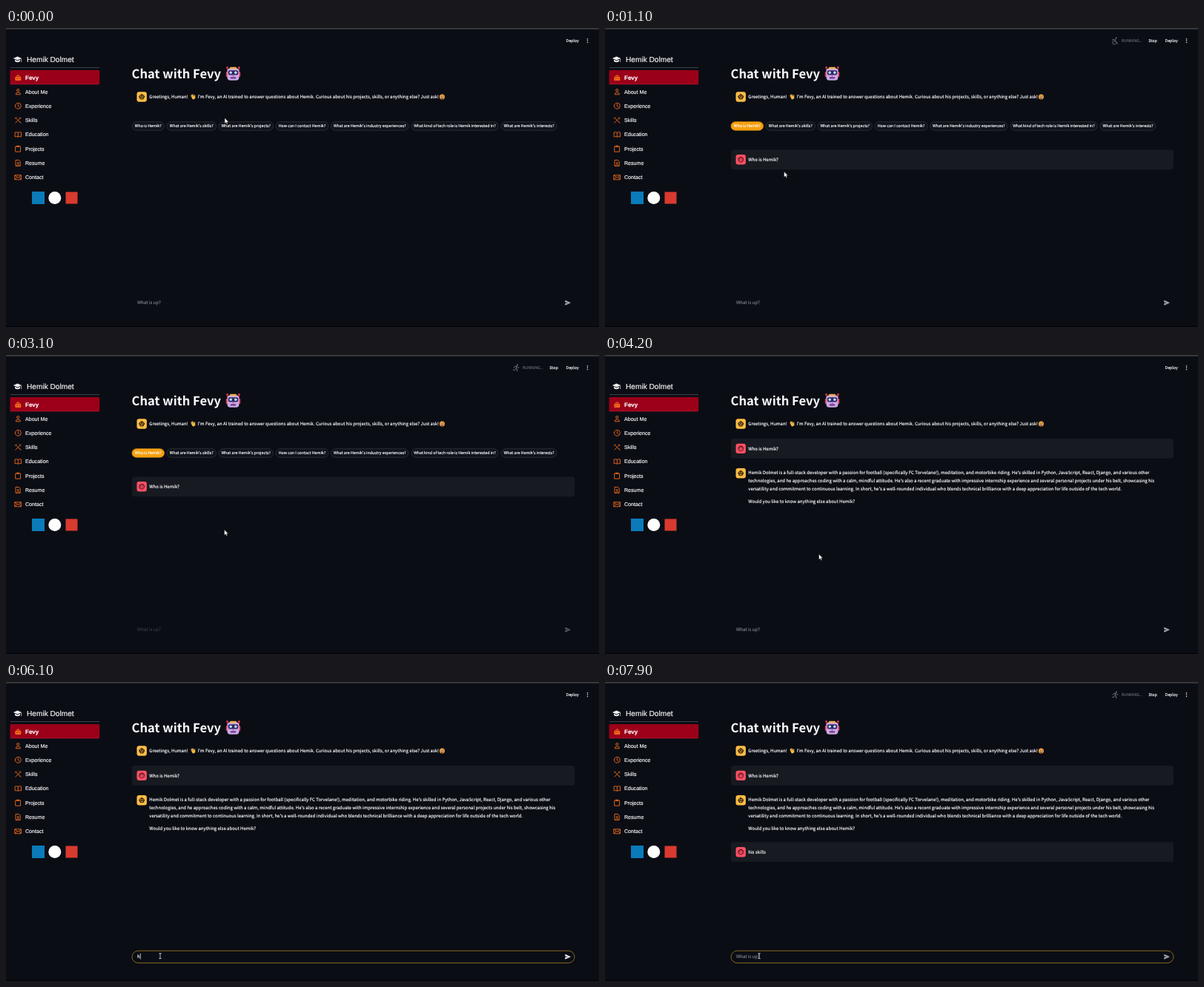
Write an HTML page that moves like this. It is 800 by 404 pixels and loops after 8000 ms.

```html
<!DOCTYPE html>
<html lang="en">
<head>
<meta charset="utf-8">
<style>
  html, body { margin: 0; width: 800px; height: 404px; overflow: hidden; background: #0b0d15; }
  svg { display: block; }
  text { font: 6px "Noto Sans CJK JP", "Noto Sans CJK SC", "Open Sans", sans-serif; fill: #fafafc; stroke: #fafafc; stroke-width: .16; white-space: pre; text-rendering: geometricPrecision; }
  .small { font-size: 5.3px; }
  .mid { text-anchor: middle; }
  .title { font-size: 16.6px; font-weight: 700; stroke: none; }
  .side { font: 7.1px "Liberation Sans", Arial, sans-serif; }
  .owner { font-size: 10.15px; }
  .active { font-size: 8px; font-weight: 700; }
  .muted { fill: #83868c; stroke: none; }
  .line { fill: none; stroke-width: .9; stroke-linecap: round; stroke-linejoin: round; }
</style>
</head>
<body>
<svg id="stage" width="800" height="404" viewBox="0 0 800 404"></svg>
<script>
const LOOP = 8000;
const CLICK = 700, ASKED = 800, RUN = 900, DIM = 2000, ANSWER = 3700;
const FOCUS = 4700, TYPE = 6000, SUBMIT = 7400, RUN_AGAIN = 7500;
const QUESTION = 'his skills';
const ORANGE = '#ef6c1a';

const text = (x, y, s, cls = '', extra = '') => `<text x="${x}" y="${y}" class="${cls}" ${extra}>${s}</text>`;
const rect = (x, y, w, h, fill, r = 0, extra = '') =>
  `<rect x="${x}" y="${y}" width="${w}" height="${h}" rx="${r}" fill="${fill}" ${extra}/>`;
const circle = (x, y, r, fill, extra = '') => `<circle cx="${x}" cy="${y}" r="${r}" fill="${fill}" ${extra}/>`;
const line = (d, color, extra = '') => `<path class="line" d="${d}" stroke="${color}" ${extra}/>`;
const group = (id, body) => `<g id="${id}">${body}</g>`;
const at = (x, y, body) => `<g transform="translate(${x} ${y})">${body}</g>`;

// Avatars and icons are drawn around their own centre.
const botAvatar = rect(-6.7, -6.7, 13.4, 13.4, '#ffbd45', 3)
  + rect(-4, -1.4, 8, 2.6, '#4a3310', 1) + rect(-3, -3, 6, 6.4, '#4a3310', 1.6) + circle(0, -3.4, .9, '#4a3310')
  + circle(-1.3, -.8, .7, '#ffbd45') + circle(1.3, -.8, .7, '#ffbd45')
  + rect(-1.4, 1.2, 2.8, .8, '#ffbd45');
const userAvatar = rect(-6.7, -6.7, 13.4, 13.4, '#fb5064', 3)
  + circle(0, 0, 3.3, 'none', 'stroke="#5a1722" stroke-width="1.1"')
  + line('M-3 -1 Q0 -.6 1 -2.6 Q1.6 -1.2 3 -1', '#5a1722')
  + circle(-1.2, .6, .6, '#5a1722') + circle(1.2, .6, .6, '#5a1722');

const menu = [
  ['About Me', 'M-1.6 -2 A1.6 1.6 0 1 1 1.6 -2 A1.6 1.6 0 1 1 -1.6 -2 M-3.1 3.4 Q-3.1 .9 0 .9 Q3.1 .9 3.1 3.4Z'],
  ['Experience', 'M-4 0 A4 4 0 1 1 4 0 A4 4 0 1 1 -4 0 M0 -2.4 V.3 L1.7 1.4'],
  ['Skills', 'M-3.5 -3.5 L3.5 3.5 M3.5 -3.5 L-3.5 3.5 M1.8 1.8 L3.6 3.6 M-3.8 -2.2 L-2.2 -3.8 M2 -3.8 L3.8 -2'],
  ['Education', 'M0 -2.6 Q-2 -3.8 -4.2 -2.8 V3 Q-2 2.2 0 3.2 Q2 2.2 4.2 3 V-2.8 Q2 -3.8 0 -2.6 V3.2'],
  ['Projects', 'M-3.2 -3.2 H3.2 V4 H-3.2Z M-1.3 -4 H1.3 V-2.7 H-1.3Z'],
  ['Resume', 'M-2.9 -4 H1.2 L2.9 -2.3 V4 H-2.9Z M-1 0 A1 1 0 1 1 1 0 A1 1 0 1 1 -1 0 M-1.8 3 Q0 .4 1.8 3'],
  ['Contact', 'M-4.1 -3 H4.1 V3 H-4.1Z M-4.1 -2.5 L0 .4 L4.1 -2.5 M-4.1 2.8 L-1.3 -.4 M4.1 2.8 L1.3 -.4']
];

const sidebar =
  '<path d="M9.8 41 L15.5 38.4 L21.2 41 L15.5 43.6Z M12 42.8 V45 Q15.5 47.4 19 45 V42.8 L15.5 44.4Z M20.4 41.4 H21.1 V46 H20.4Z" fill="#eee"/>'
  + text(28, 46, 'Hemik Dolmet', 'side owner')
  + rect(6, 53, 120, .8, '#4b4d54')
  + rect(5.5, 57, 120.7, 19.2, '#9c0019', 1.5)
  + line('M6 75.8 H125.5', '#c23048', 'stroke-dasharray="1.4 1.2" style="stroke-width:.5"')
  + at(16.3, 67.3, rect(-4, -1.2, 8, 4.8, ORANGE, 1) + line('M-2 -1.2 V-2.6 H2 V-1.2 M0 -2.6 V-4', ORANGE)
    + circle(-1.6, .8, .7, '#9c0019') + circle(1.6, .8, .7, '#9c0019'))
  + text(26, 70.2, 'Fevy', 'side active')
  + menu.map(([name, d], i) => {
    const y = 86 + i * 19.3;
    return at(16.3, y, line(d, ORANGE)) + text(26, y + 2.5, name, 'side');
  }).join('')
  + rect(35, 221, 17, 17, '#0a7bb8') + circle(65.8, 229.5, 8.5, '#fff') + rect(80.5, 221.5, 16, 16, '#d93a30');

const robotFace =
  line('M298.6 58 V53.6 M314.4 58 V53.6', '#d23b4e')
  + circle(298.6, 53.4, 1.4, '#e5394c') + circle(314.4, 53.4, 1.4, '#e5394c')
  + rect(296.8, 59, 3, 7, '#e0435c', 1) + rect(313.2, 59, 3, 7, '#e0435c', 1)
  + rect(298.6, 54.3, 15.8, 16.4, '#cba9e6', 4) + rect(302, 52.8, 9, 3, '#e9b25c', 1)
  + rect(299.8, 57.2, 13.4, 6.2, '#33266a', 2)
  + circle(303.2, 60.3, 1.7, '#b9ecf8') + circle(309.8, 60.3, 1.7, '#b9ecf8')
  + '<path d="M305.5 65.6 L306.5 63.8 L307.5 65.6Z" fill="#e5394c"/>'
  + rect(302.7, 66.3, 7.6, 2.2, '#6a3b8e', 1);

const wave = at(252.3, 93, `<g transform="rotate(-25)">${rect(-2, -.8, 4.4, 4.2, '#f4b942', 1.6)
  + line('M-1.5 0 V-2.6 M-.2 0 V-3.2 M1.1 0 V-2.8 M2.2 1 L3 -1', '#f4b942', 'style="stroke-width:1.1"')}</g>`);
const grin = at(588.4, 93, circle(0, 0, 3.5, '#f5a742') + circle(-1.2, -.9, .6, '#4b2a12') + circle(1.2, -.9, .6, '#4b2a12')
  + '<path d="M-2.1 .5 H2.1 Q1.6 2.7 0 2.7 Q-1.6 2.7 -2.1 .5Z" fill="#6b2a1c"/>' + rect(-1.6, .5, 3.2, .7, '#fff'));

const greeting = text(169.6, 67.9, 'Chat with Fevy', 'title') + robotFace
  + at(183.2, 93, botAvatar)
  + text(193.3, 95.1, 'Greetings, Human!') + wave
  + text(258.6, 95.1, "I'm Fevy, an AI trained to answer questions about Hemik. Curious about his projects, skills, or anything else? Just ask!")
  + grin;

const pills = [
  [170, 43.5, 'Who is Hemik?'], [217, 66.5, "What are Hemik's skills?"], [287, 73.5, "What are Hemik's projects?"],
  [364, 71, 'How can I contact Hemik?'], [438.5, 104.5, "What are Hemik's industry experiences?"],
  [547, 117, 'What kind of tech role is Hemik interested in?'], [668, 75, "What are Hemik's interests?"]
].map(([x, w, label], i) =>
  rect(x, 126.7, w, 11.6, '#10131b', 5.8, `stroke="#3b3e46" stroke-width=".6" id="pill${i}"`)
  + text(x + w / 2, 134.4, label, 'small mid')).join('');

const userMessage = (y, s) => rect(170, y - 13.4, 597, 26.8, '#171a21', 3.4)
  + at(183.2, y, userAvatar) + text(193.3, y + 2.2, s);

const answer = userMessage(126.4, 'Who is Hemik?') + at(183.2, 159.8, botAvatar) + [
  [160.9, "Hemik Dolmet is a full-stack developer with a passion for football (specifically FC Torvelane!), meditation, and motorbike riding. He's skilled in Python, JavaScript, React, Django, and various other"],
  [171.7, "technologies, and he approaches coding with a calm, mindful attitude. He's also a recent graduate with impressive internship experience and several personal projects under his belt, showcasing his"],
  [182.5, "versatility and commitment to continuous learning. In short, he's a well-rounded individual who blends technical brilliance with a deep appreciation for life outside of the tech world."],
  [199.9, 'Would you like to know anything else about Hemik?']
].map(([y, s]) => text(193.3, y, s)).join('');

const poses = [
  'M-3.6 3 Q-1.8 1.8 0 3 T3.6 3 M-3 .8 L0 -1.6 L2.4 1',
  'M-4 2 A1.6 1.6 0 1 0 -.8 2 A1.6 1.6 0 1 0 -4 2 M1 2 A1.6 1.6 0 1 0 4.2 2 A1.6 1.6 0 1 0 1 2 M0 2.4 L-1 .2 L1.2 -1.6 L3 -.4',
  'M1 -2 L0 1 L2 2.4 L1.4 4.6 M0 1 L-1.4 3 L-3.8 3.4 M-2.8 0 L-1.6 -1.8 L1 -2 L2.4 -.2 L3.8 -.4',
  'M.6 -2 L-.4 .8 L2.2 1.4 L3.2 4.2 M-1.6 .2 A2.4 2.4 0 1 0 1.4 3.2 M.2 -1 L-2.6 -2.2 L-3.6 -.6'
];
const running = at(688, 17.3, circle(1.7, -3.7, 1, '#777a80') + line('', '#777a80', 'id="runner"'))
  + text(697, 19.3, 'RUNNING...', 'small muted') + text(733.3, 19.3, 'Stop', 'small');

const stage = document.getElementById('stage');
stage.innerHTML =
  rect(0, 0, 800, 404, '#0b0d15') + rect(0, 0, 800, 1.8, '#3a3b3d') + rect(0, 402.8, 800, 1.2, '#030407')
  + sidebar + greeting
  + text(755.5, 19.3, 'Deploy', 'small') + [14.8, 17.1, 19.4].map(y => circle(784.5, y, .75, '#e8e8ea')).join('')
  + group('running', running) + group('pills', pills)
  + group('asked', userMessage(177.8, 'Who is Hemik?'))
  + group('answer', answer) + group('followUp', userMessage(229.7, QUESTION))
  + rect(170, 363.2, 597, 16.4, '#0b0d14', 8.2, 'id="field" stroke="#94731f" stroke-width=".9"')
  + text(177, 373.4, '', '', 'id="entry"') + rect(0, 366.6, .7, 8, '#fff', 0, 'id="caret"')
  + '<path id="send" d="M754.3 367.7 L762 371.2 L754.3 374.7 V372 L758.6 371.2 L754.3 370.4Z"/>'
  + group('arrow', '<path d="M0 0 V7.6 L1.8 6 L3 8.6 L4.2 8 L3.1 5.6 H5.4Z" fill="#fff" stroke="#111" stroke-width=".5"/>')
  + group('beam', line('M-1.3 -3.4 H1.3 M0 -3.4 V3.4 M-1.3 3.4 H1.3', '#ddd', 'style="stroke-width:.8"'));

const $ = id => document.getElementById(id);
const show = (id, on) => $(id).setAttribute('visibility', on ? 'visible' : 'hidden');

// time, x, y of the pointer
const path = [
  [0, 295, 121.5], [500, 192, 130.5], [800, 192, 130.5], [1100, 241.5, 194], [2400, 294.5, 236],
  [3700, 294.5, 236], [4200, 288.5, 269], [4600, 208, 370.2], [LOOP, 208, 370.2]
];

function pointer(t) {
  const i = path.findIndex(k => k[0] > t);
  const [t0, x0, y0] = path[i - 1], [t1, x1, y1] = path[i];
  const u = (t - t0) / (t1 - t0), e = u * u * (3 - 2 * u);
  return [x0 + (x1 - x0) * e, y0 + (y1 - y0) * e];
}

function draw(t) {
  const between = (a, b) => t >= a && t < b;
  show('running', between(RUN, ANSWER) || t >= RUN_AGAIN);
  $('runner').setAttribute('d', poses[Math.floor(t / 300) % poses.length]);

  show('pills', t < ANSWER);
  show('asked', between(ASKED, ANSWER));
  show('answer', t >= ANSWER);
  show('followUp', t >= SUBMIT);
  $('pill0').setAttribute('fill', between(CLICK, ANSWER) ? '#f5a00f' : '#10131b');
  $('pill0').setAttribute('stroke', between(400, ANSWER) ? '#f5a00f' : '#3b3e46');

  const typing = between(TYPE, SUBMIT), dim = between(DIM, ANSWER);
  const entry = $('entry');
  entry.textContent = typing ? QUESTION.slice(0, Math.floor((t - TYPE) / 130) + 1) : 'What is up?';
  entry.style.fill = entry.style.stroke = typing ? '#fafafc' : dim ? '#35383f' : '#7b7d83';
  $('send').setAttribute('fill', typing ? '#f4f4f6' : dim ? '#55585f' : '#a9abb2');
  show('field', t >= FOCUS);
  const blinkStart = t >= SUBMIT ? SUBMIT : FOCUS;
  show('caret', typing || t >= FOCUS && Math.floor((t - blinkStart) / 500) % 2 === 0);
  $('caret').setAttribute('x', typing ? 177.2 + entry.getComputedTextLength() : 177);

  const [x, y] = pointer(t), overField = y > 363;
  show('arrow', !overField);
  show('beam', overField);
  $(overField ? 'beam' : 'arrow').setAttribute('transform', `translate(${x} ${y})`);
}

function tick() {
  draw(performance.now() % LOOP);
  requestAnimationFrame(tick);
}
tick();
</script>
</body>
</html>
```
